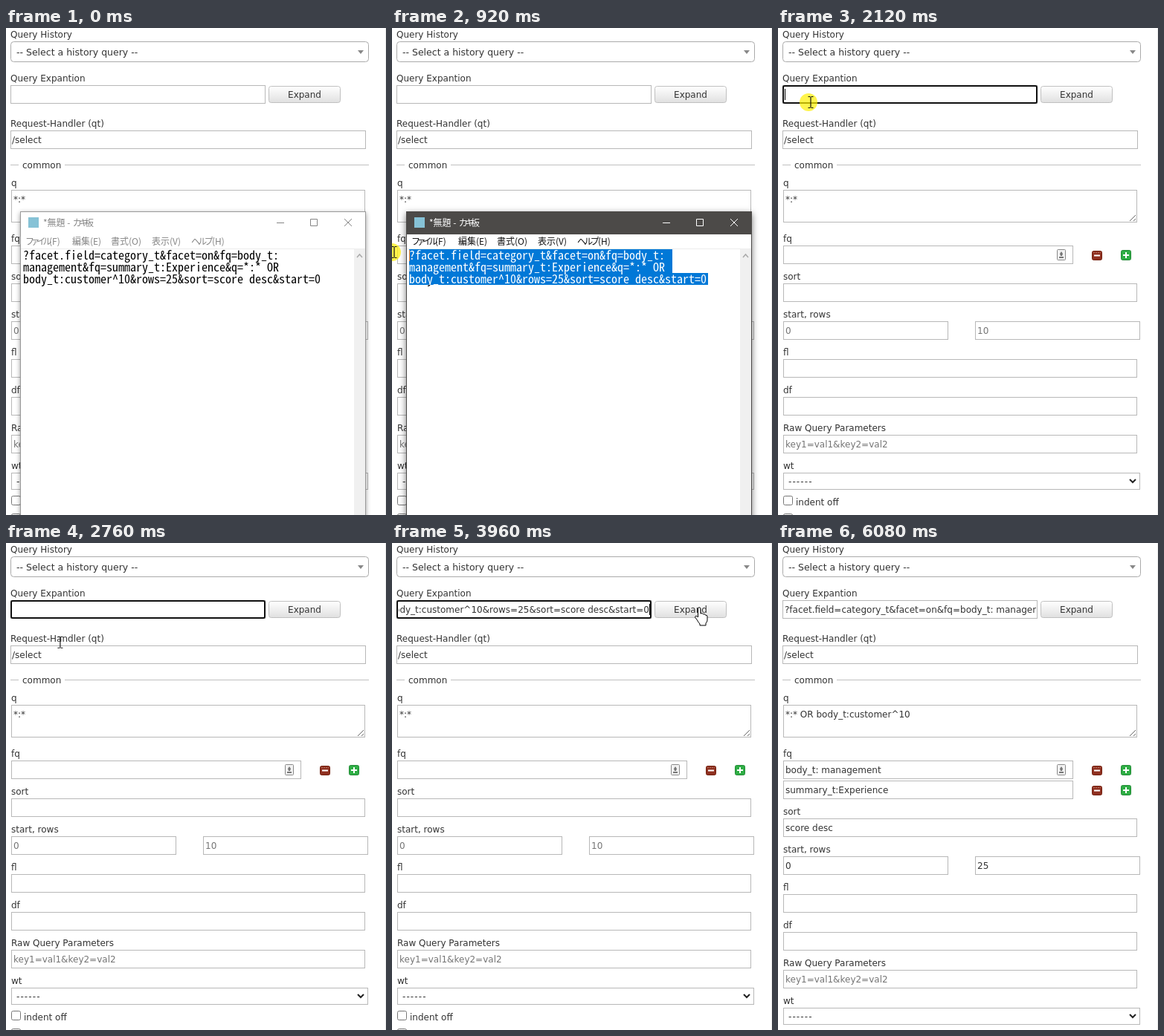
Animation, 511 px wide and 656 px high, one loop 6160 ms. Source, as an HTML page:

```html
<!DOCTYPE html>
<html lang="en">
<head>
<meta charset="utf-8">
<title>Query expansion</title>
<style>
html, body { margin: 0; width: 100%; height: 100%; overflow: hidden; background: #fff; }
svg { display: block; }
text { font: 12px "DejaVu Sans", sans-serif; fill: #333; white-space: pre; }
.box { fill: #fff; stroke: #b8b8b8; }
.hint text, text.hint { fill: #757575; }
.jp text { font: 12px "Noto Sans CJK JP", "Noto Sans CJK", sans-serif; fill: inherit; }
.jp .kana { font-feature-settings: "palt"; letter-spacing: -2.4px; }
#memo text { font: inherit; fill: inherit; }
.ring { fill: none; stroke: #101010; stroke-width: 2; }
.anim { animation: 6160ms step-end infinite; }

/* window */
.memo { animation-name: memo; }
.idle { animation-name: idle; }
.active { animation-name: active; }
.rows { animation-name: rows; }
.last { animation-name: last; }
@keyframes memo { 0% { opacity: 1 } 34.41%, to { opacity: 0 } }
@keyframes idle { 0% { opacity: 1 } 3.89%, to { opacity: 0 } }
@keyframes active { 0% { opacity: 0 } 3.89%, to { opacity: 1 } }
@keyframes rows { 0% { transform: translateX(600px) } 14.28%, to { transform: none } }
@keyframes last {
  0% { transform: translateX(600px) }
  5.19% { transform: translateX(400px); animation-timing-function: steps(50) }
  13.63%, to { transform: none }
}

/* form */
.pre { animation-name: pre; }
.post { animation-name: post; }
.shift { animation-name: shift; }
.focus { animation-name: focus; }
.tail { animation-name: tail; }
.head { animation-name: head; }
.press { animation-name: press; }
.down { animation-name: down; }
.caret1 { animation-name: caret1; }
.caret2 { animation-name: caret2; }
@keyframes pre { 0% { opacity: 1 } 71.42%, to { opacity: 0 } }
@keyframes post { 0% { opacity: 0 } 71.42%, to { opacity: 1 } }
@keyframes shift { 0% { transform: none } 71.42%, to { transform: translateY(27px) } }
@keyframes focus { 0% { opacity: 0 } 34.41% { opacity: 1 } 68.18%, to { opacity: 0 } }
@keyframes tail { 0% { opacity: 0 } 45.45% { opacity: 1 } 68.18%, to { opacity: 0 } }
@keyframes head { 0% { opacity: 0 } 68.18%, to { opacity: 1 } }
@keyframes press { 0% { opacity: 0 } 68.18% { opacity: 1 } 98.7%, to { opacity: 0 } }
@keyframes down { 0% { opacity: 0 } 68.18% { opacity: 1 } 71.42%, to { opacity: 0 } }
@keyframes caret1 { 0% { opacity: 0 } 34.41% { opacity: 1 } 42.85%, to { opacity: 0 } }
@keyframes caret2 {
  0% { opacity: 0 } 45.45% { opacity: 1 } 53.89% { opacity: 0 }
  62.33% { opacity: 1 } 68.18%, to { opacity: 0 }
}

/* pointer */
.pointer { animation-name: move; animation-timing-function: linear; }
.glow { animation-name: glow; }
.beam { animation-name: beam; }
.arrow { animation-name: arrow; }
.hand { animation-name: hand; }
@keyframes move {
  0% { transform: translate(-60px, -60px); animation-timing-function: step-end }
  3.89% { transform: translate(433px, 340px) }
  5.19% { transform: translate(428px, 338px) }
  13.63% { transform: translate(24px, 374px) }
  14.28% { transform: translate(10px, 306px) }
  14.93% { transform: translate(3px, 302px); animation-timing-function: step-end }
  15.58%, 22.72% { transform: translate(68px, 314px); animation-timing-function: ease-in }
  27.27% { transform: translate(29px, 180px); animation-timing-function: ease-out }
  31.81%, 42.85% { transform: translate(44px, 100px); animation-timing-function: ease-in-out }
  50.64% { transform: translate(262px, 355px) }
  51.94%, 53.89% { transform: translate(239px, 350px); animation-timing-function: ease-in-out }
  63.63% { transform: translate(405px, 94px); animation-timing-function: step-end }
  64.28%, 83.7% { transform: translate(413px, 87px); animation-timing-function: step-end }
  84.41% { transform: translate(417px, 97px); animation-timing-function: ease-in }
  89.6% { transform: translate(494px, 627px); animation-timing-function: step-end }
  90.25%, to { transform: translate(-60px, -60px) }
}
@keyframes glow {
  0% { opacity: 0 } 3.89% { opacity: 1 } 15.58% { opacity: 0 } 34.41% { opacity: 1 }
  36.36% { opacity: 1; animation-timing-function: linear }
  38.31% { opacity: 0 } 68.18% { opacity: 1 } 71.42%, to { opacity: 0 }
}
@keyframes beam { 0% { opacity: 1 } 56.49%, to { opacity: 0 } }
@keyframes arrow { 0% { opacity: 0 } 56.49% { opacity: 1 } 64.28% { opacity: 0 } 85.06%, to { opacity: 1 } }
@keyframes hand { 0% { opacity: 0 } 64.28% { opacity: 1 } 85.06%, to { opacity: 0 } }
</style>
</head>
<body>
<svg width="511" height="656" viewBox="0 0 511 656">
  <defs>
    <linearGradient id="metal" x2="0" y2="1">
      <stop stop-color="#fff"/><stop offset="1" stop-color="#e0e0e0"/>
    </linearGradient>
    <clipPath id="field"><rect x="9" y="79" width="338" height="22"/></clipPath>
    <clipPath id="picked">
      <rect class="anim rows" x="23" y="298" width="354" height="32"/>
      <rect class="anim last" x="23" y="330" width="402" height="16"/>
    </clipPath>
    <g id="buttons">
      <rect x="422.5" y="300.5" width="13" height="12" rx="2" fill="#8f3020" stroke="#74200f"/>
      <path d="M424 302.5h10" stroke="#b5705f" stroke-dasharray="2 1"/>
      <path d="M425 306.5h8" stroke="#fff" stroke-width="2"/>
      <rect x="461.5" y="299.5" width="13" height="13" rx="2" fill="#2fae45" stroke="#218a35"/>
      <path d="M464 306h8M468 302v8" stroke="#fff" stroke-width="2"/>
    </g>
    <g id="bar" class="jp">
      <text x="50" y="266.5">*無題 - <tspan class="kana" x="90">カキ</tspan><tspan x="106">板</tspan></text>
      <path d="M364 262.5h10M409.5 257.5h9v9h-9zM455 257l10 10M465 257l-10 10" fill="none" stroke="currentColor"/>
    </g>
    <g id="menu" class="jp">
      <text x="27" y="291.5"><tspan class="kana">ファイル</tspan><tspan x="58">(F)</tspan></text>
      <text x="89" y="291.5">編集(E)</text>
      <text x="141" y="291.5">書式(O)</text>
      <text x="196" y="291.5">表示(V)</text>
      <text x="249" y="291.5"><tspan class="kana">ヘルプ</tspan><tspan x="277">(H)</tspan></text>
    </g>
  </defs>

  <rect width="511" height="656" fill="#fff"/>
  <path d="M510.5 0v656" stroke="#ececec"/>

  <text x="6" y="13">Query History</text>
  <rect x="6.5" y="18.5" width="481" height="27" rx="4" fill="#fff" stroke="#aaa"/>
  <text x="14" y="37" style="font-size:12.5px">-- Select a history query --</text>
  <path d="M473 30h8l-4 5z" fill="#888"/>

  <text x="6" y="72">Query Expantion</text>
  <rect class="box" x="6.5" y="77.5" width="342" height="24"/>
  <rect class="anim focus ring" x="7" y="78" width="341" height="23" rx="2"/>
  <g clip-path="url(#field)">
    <text class="anim tail" x="346" y="94" text-anchor="end">body_t:customer^10&amp;rows=25&amp;sort=score desc&amp;start=0</text>
    <text class="anim head" x="9" y="94">?facet.field=category_t&amp;facet=on&amp;fq=body_t: management</text>
  </g>
  <path class="anim caret1" d="M9.5 82v15" stroke="#000"/>
  <path class="anim caret2" d="M346.5 82v15" stroke="#000"/>

  <rect x="353.5" y="78.5" width="96" height="22" rx="3" fill="url(#metal)" stroke="#c0c0c0"/>
  <rect class="anim down" x="354" y="79" width="95" height="21" rx="3" fill="#e4e4e4"/>
  <rect class="anim press ring" x="354" y="79" width="95" height="21" rx="3"/>
  <text x="401.5" y="94" text-anchor="middle">Expand</text>

  <text x="6" y="133">Request-Handler (qt)</text>
  <rect class="box" x="6.5" y="138.5" width="477" height="24"/>
  <text x="8" y="155">/select</text>

  <path d="M6 184.5h11M79 184.5h409" stroke="#c0c0c0"/>
  <text x="22" y="189">common</text>

  <text x="7" y="213">q</text>
  <rect class="box" x="7.5" y="218.5" width="475" height="43"/>
  <path d="M473 260l8-8M478 260l3-3" stroke="#666"/>
  <text class="anim pre" x="10" y="235">*:*</text>
  <text class="anim post" x="10" y="235">*:* OR body_t:customer^10</text>

  <text x="7" y="288">fq</text>
  <rect class="box" x="7.5" y="293.5" width="389" height="24"/>
  <rect x="375.5" y="298.5" width="11" height="14" rx="1" fill="#f2f2f2" stroke="#888"/>
  <path d="M381 301l2 3-1 3h-2l-1-3zM378 308h6v2h-6z" fill="#777"/>
  <use href="#buttons"/>
  <g class="anim post">
    <text x="10" y="310">body_t: management</text>
    <rect class="box" x="7.5" y="320.5" width="389" height="24"/>
    <text x="10" y="337">summary_t:Experience</text>
    <use href="#buttons" y="27"/>
  </g>

  <g class="anim shift">
    <text x="7" y="339">sort</text>
    <rect class="box" x="7.5" y="344.5" width="475" height="24"/>
    <text x="7" y="390">start, rows</text>
    <rect class="box" x="7.5" y="395.5" width="221" height="24"/>
    <rect class="box" x="265.5" y="395.5" width="221" height="24"/>
    <g class="anim pre hint">
      <text x="10" y="412">0</text>
      <text x="268" y="412">10</text>
    </g>
    <g class="anim post">
      <text x="10" y="361">score desc</text>
      <text x="10" y="412">0</text>
      <text x="268" y="412">25</text>
    </g>
    <text x="7" y="441">fl</text>
    <rect class="box" x="7.5" y="446.5" width="475" height="24"/>
    <text x="7" y="492">df</text>
    <rect class="box" x="7.5" y="497.5" width="475" height="24"/>
    <text x="7" y="543">Raw Query Parameters</text>
    <rect class="box" x="7.5" y="548.5" width="475" height="24"/>
    <text class="hint" x="10" y="565">key1=val1&amp;key2=val2</text>
    <text x="7" y="594">wt</text>
    <rect class="box" x="7.5" y="599.5" width="479" height="22"/>
    <text x="14" y="615" letter-spacing="1.1">------</text>
    <path d="M473 608l4 4 4-4" fill="none" stroke="#222" stroke-width="2"/>
    <rect x="7.5" y="630.5" width="12" height="12" rx="2" fill="#fff" stroke="#767676"/>
    <text x="24" y="643">indent off</text>
    <rect x="7.5" y="654.5" width="12" height="12" rx="2" fill="#fff" stroke="#767676"/>
  </g>

  <g class="anim memo">
    <rect class="anim idle" x="19.5" y="247.5" width="464" height="430" fill="#fff" stroke="#999"
      style="filter:drop-shadow(0 2px 3px #0006)"/>
    <rect class="anim active" x="19.5" y="247.5" width="464" height="430" fill="#fff" stroke="#4b4948"
      style="filter:drop-shadow(0 3px 5px #0008)"/>
    <g class="anim idle" fill="#858585" color="#858585">
      <use href="#bar"/><use href="#menu"/>
    </g>
    <g class="anim active">
      <rect x="19" y="247" width="465" height="31" fill="#4c4a48"/>
      <use href="#bar" fill="#fff" color="#fff"/>
      <use href="#menu" fill="#111"/>
    </g>
    <rect x="30" y="255" width="14" height="14" fill="#86c2d6"/>
    <path d="M20 297.5h463" stroke="#ededed"/>
    <rect x="468" y="298" width="15" height="358" fill="#f0f0f0"/>
    <path d="M472 309l3.5-4 3.5 4" fill="none" stroke="#aaa" stroke-width="1.5"/>
    <g id="memo">
      <text x="23" y="312">?facet.field=category_t&amp;facet=on&amp;fq=body_t:</text>
      <text x="23" y="328">management&amp;fq=summary_t:Experience&amp;q=*:* OR</text>
      <text x="23" y="344">body_t:customer^10&amp;rows=25&amp;sort=score desc&amp;start=0</text>
    </g>
    <g clip-path="url(#picked)">
      <path d="M23 298h354v32h48v16H23z" fill="#0078d7"/>
      <use href="#memo" fill="#fff"/>
      <path d="M23.5 299v15" stroke="#ff8728"/>
    </g>
  </g>

  <g class="anim pointer">
    <circle class="anim glow" cx="-3" r="12" fill="#ffef00" fill-opacity=".7"/>
    <path class="anim beam" d="M-3.5-7.5h3M.5-7.5h3M0-7V7M-3.5 7.5h3M.5 7.5h3" stroke="#111" stroke-width="1.2"/>
    <path class="anim arrow" d="M.5.5v16l3.7-3.5 2.4 5.5 2.4-1-2.4-5.4h5z" fill="#fff" stroke="#000"/>
    <path class="anim hand" fill="#fff" stroke="#000" stroke-linejoin="round"
      d="M-1.5 1.5a1.7 1.7 0 0 1 3.4 0V8q3-1.2 3.6 1 2.700-1 3.200 1.300 2.300-.5 2.300 1.700V17q0 2-2 4v3H1v-2q-2-2-3.500-5l-3-4q.5-2.500 2.500-1.500l1.500 1.500z"/>
  </g>
</svg>
<script>
// Pick the size at which one monospace cell is 8px wide.
const mono = '"Noto Sans Mono CJK JP", "Liberation Mono", monospace';
const ctx = document.createElement('canvas').getContext('2d');
ctx.font = `100px ${mono}`;
document.getElementById('memo').style.font = `${800 / ctx.measureText('0').width}px ${mono}`;
</script>
</body>
</html>
```
